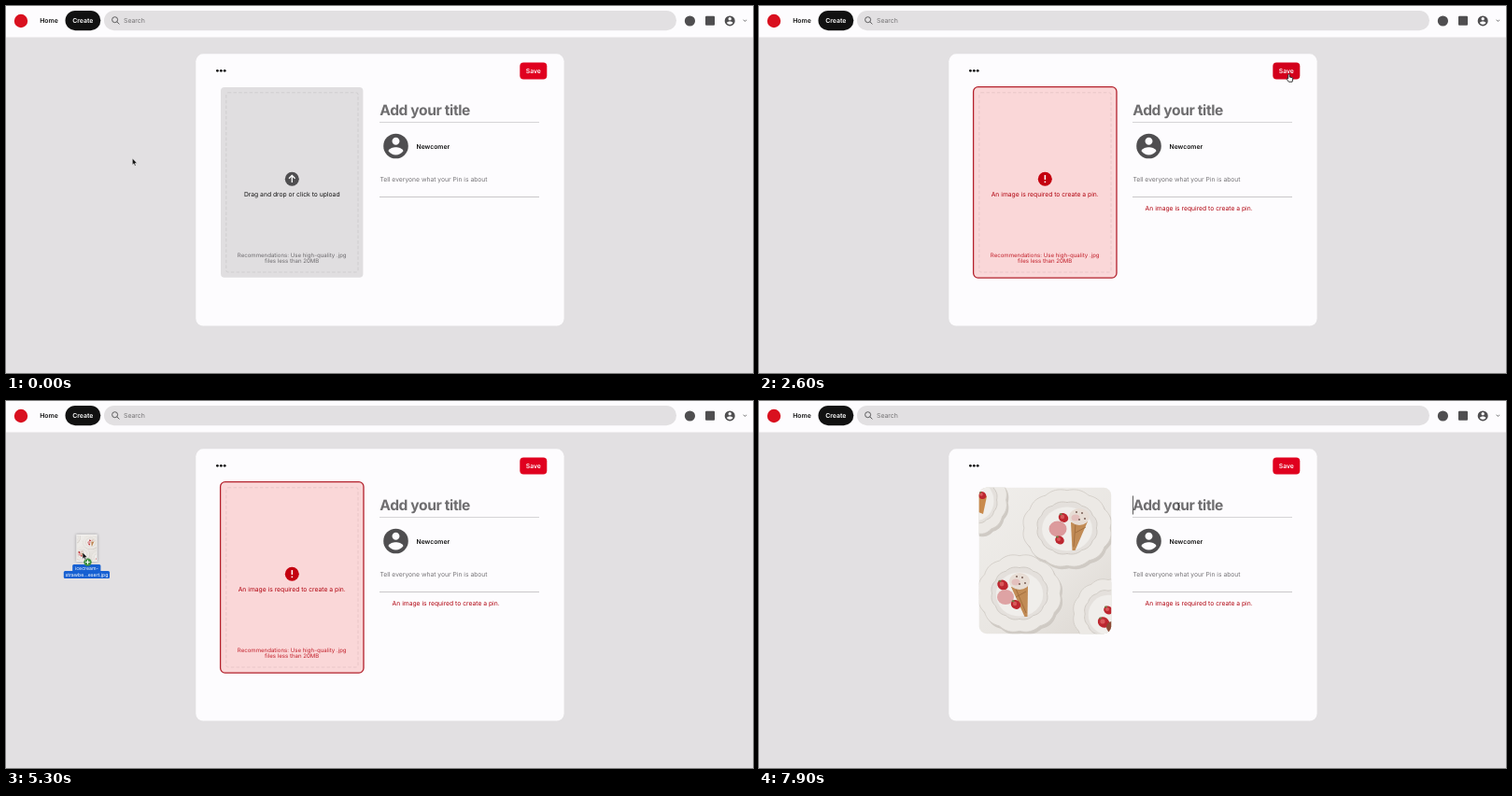
Recreate the animation shown at these times as an HTML page with a canvas. Size 800 by 393 pixels, loop 8 s.

```html
<!DOCTYPE html>
<html lang="en">
<head>
<meta charset="utf-8">
<title>Create a pin</title>
<style>
  html, body { margin: 0; width: 100%; height: 100%; overflow: hidden; background: #e2e0e2; }
  canvas { display: block; width: 100vw; height: 100vh; }
</style>
</head>
<body>
<canvas id="stage"></canvas>
<script>
const W = 800, H = 393, LOOP = 8000, STEP = 100;
const ERROR_AT = 2200, DRAG_AT = 4800, DROP_AT = 6200, PHOTO_AT = 6400, CARET_AT = 7500;
const canvas = document.getElementById('stage');
const ctx = canvas.getContext('2d');
const paper = '#fdfcfe', grey = '#e2e0e2', dark = '#4f4e50', red = '#c4000f';

// Keys are [time, x, y].
const pointerPath = [
  [0, 135.3, 163], [200, 140, 172], [400, 200, 178], [600, 320, 150], [800, 440, 122],
  [900, 480, 114], [1200, 540, 88], [1500, 566, 75], [1800, 567.5, 73], [2700, 567.5, 73],
  [3000, 440, 90], [3300, 200, 112], [3600, 10, 121], [3700, 2, 121], [3900, -10, 121]
];
const dragPath = [
  [4800, -130, -4], [4900, -95, -3], [5100, -40, -1], [5300, 0, 0], [5500, 70, 5],
  [5700, 145, 12], [5900, 182, 14], [6100, 192.5, 14]
];
const titlePath = [
  [6200, 275.5, 178.5], [6500, 275.5, 178.5], [6700, 310, 168], [6900, 400, 135],
  [7100, 460, 112], [7200, 449.5, 113]
];

function along(path, t) {
  const i = path.findIndex(k => k[0] > t);
  if (i === 0) return path[0].slice(1);
  if (i < 0) return path[path.length - 1].slice(1);
  const [t0, x0, y0] = path[i - 1], [t1, x1, y1] = path[i];
  const u = (t - t0) / (t1 - t0);
  return [x0 + (x1 - x0) * u, y0 + (y1 - y0) * u];
}

function box(x, y, w, h, r, fill, stroke, line = 1) {
  ctx.beginPath();
  ctx.roundRect(x, y, w, h, r);
  paint(fill, stroke, line);
}

function disc(x, y, rx, fill, ry = rx, turn = 0) {
  ctx.beginPath();
  ctx.ellipse(x, y, rx, ry, turn, 0, Math.PI * 2);
  paint(fill);
}

function poly(points, fill, stroke, line = 1) {
  ctx.beginPath();
  points.forEach(([x, y]) => ctx.lineTo(x, y));
  if (fill) ctx.closePath();
  paint(fill, stroke, line);
}

function paint(fill, stroke, line) {
  if (fill) { ctx.fillStyle = fill; ctx.fill(); }
  if (stroke) { ctx.strokeStyle = stroke; ctx.lineWidth = line; ctx.stroke(); }
}

function text(s, x, y, size, color, { weight = 400, align = 'left', space = 0 } = {}) {
  ctx.font = `${weight} ${size}px Inter, "Open Sans", sans-serif`;
  ctx.letterSpacing = space + 'px';
  ctx.textAlign = align;
  ctx.fillStyle = color;
  ctx.fillText(s, x, y);
}

function at(x, y, scale, draw) {
  ctx.save();
  ctx.translate(x, y);
  ctx.scale(scale, scale);
  draw();
  ctx.restore();
}

const bust = new Path2D('M0-7c1.66 0 3 1.34 3 3s-1.34 3-3 3-3-1.34-3-3 1.34-3 3-3z' +
  'm0 14.2c-2.5 0-4.71-1.28-6-3.22.03-1.99 4-3.08 6-3.08 1.99 0 5.97 1.09 6 3.08-1.29 1.94-3.5 3.22-6 3.22z');

function avatar(x, y, r) {
  at(x, y, r / 10, () => {
    disc(0, 0, 10, dark);
    ctx.fillStyle = paper;
    ctx.fill(bust);
  });
}

function header() {
  box(0, 0, W, 33.5, 0, paper);
  disc(16, 16, 7.2, '#d9101f');
  const bold = { weight: 600, align: 'center' };
  text('Home', 46, 18.4, 6.9, '#111', bold);
  box(63.5, 5, 37.8, 21.2, 10.6, '#111');
  text('Create', 82.3, 18.4, 6.9, '#fff', bold);
  box(105, 5, 613, 21.2, 10.6, grey);
  ctx.beginPath();
  ctx.arc(116.6, 14.7, 3, 0, Math.PI * 2);
  ctx.moveTo(118.8, 16.9);
  ctx.lineTo(121.4, 19.4);
  paint(null, dark, 0.9);
  text('Search', 126, 18.4, 6.9, '#747274');
  disc(732.4, 16, 5.6, dark);
  box(749, 10.8, 10, 10, 1, dark);
  avatar(775.2, 15.9, 5.5);
  poly([[789.7, 14.8], [791.4, 16.4], [793.1, 14.8]], null, dark, 0.8);
}

function rule(y) {
  box(400, y, 171, 0.9, 0, '#c9c7c9');
}

function card(hover) {
  box(203.3, 51.3, 394.3, 291.2, 8, paper);
  for (const x of [226.4, 230.3, 234.2]) disc(x, 69.3, 1.4, '#111');
  box(550.3, 60.4, 29, 18, 4, hover ? '#d3001c' : '#e0001f');
  text('Save', 564.8, 72, 6.8, '#fff', { weight: 600, align: 'center' });
  text('Add your title', 400.3, 117.4, 15.6, '#6e6d6f', { weight: 700, space: -0.4 });
  rule(124.2);
  avatar(417.5, 150, 13.3);
  text('Newcomer', 439.5, 152.5, 6.8, '#111', { weight: 600 });
  text('Tell everyone what your Pin is about', 400.4, 187.8, 6.75, '#757376');
  rule(204);
}

function dropZone(error) {
  const mid = { align: 'center' };
  if (error) box(229.6, 86.7, 153.4, 204.4, 5, '#fad7d8', '#b3202b', 1.3);
  else box(230, 87, 152.4, 203.8, 4, '#e0dee0');
  ctx.setLineDash([3.5, 2.2]);
  box(235.8, 92.8, 141.2, 192.2, 2, null, error ? '#e5c2c4' : '#cbc9cb', 0.8);
  ctx.setLineDash([]);
  disc(306.3, 185.2, 7.5, error ? red : dark);
  if (error) {
    box(305.6, 181, 1.5, 5, 0.6, '#fff');
    disc(306.35, 188.3, 0.9, '#fff');
  } else {
    poly([[306.3, 189], [306.3, 181.8]], null, '#fff', 1.3);
    poly([[303, 184.8], [306.3, 181.5], [309.6, 184.8]], null, '#fff', 1.3);
  }
  text(error ? 'An image is required to create a pin.' : 'Drag and drop or click to upload',
    306.2, 204, 6.75, error ? '#b0000d' : '#111', mid);
  const note = error ? '#c2202b' : '#6e6c6f';
  text('Recommendations: Use high-quality .jpg', 306.2, 269.2, 6.1, note, mid);
  text('files less than 20MB', 306.2, 275.3, 6.1, note, mid);
}

function scallop(x, y, rx, ry, fill, stroke) {
  ctx.beginPath();
  for (let i = 0; i <= 120; i++) {
    const a = i / 120 * Math.PI * 2;
    const k = 0.96 + 0.04 * Math.abs(Math.sin(a * 6));
    ctx.lineTo(x + rx * k * Math.cos(a), y + ry * k * Math.sin(a));
  }
  paint(fill, stroke, 0.8);
}

function plate(x, y, rx, ry) {
  scallop(x + 2, y + 3, rx, ry, '#cfcac4');
  scallop(x, y, rx, ry, '#ece9e5', '#d0cbc5');
  scallop(x, y, rx * 0.68, ry * 0.68, '#e4e0dc', '#c9c4be');
  disc(x, y + 1, rx * 0.56, '#f0eeeb', ry * 0.56);
}

function berry(x, y, r) {
  disc(x, y, r, '#bd2730', r * 0.85, 0.6);
  disc(x - 1, y - 1, r * 0.4, '#d8585a');
  disc(x - r * 0.5, y - r * 0.7, 1.6, '#6f7b45', 1);
}

function cone(x, y, tipX, tipY) {
  poly([[x - 9, y + 6], [x + 9, y + 5], [tipX + 1.5, tipY], [tipX - 1.5, tipY]], '#c18b55');
  poly([[x - 4, y + 8], [tipX, tipY - 4]], null, '#9c6939', 0.8);
  poly([[x + 7, y + 11], [x - 4, y + 17]], null, '#9c6939', 0.8);
  disc(x, y, 11, '#e7ddd5', 9);
  disc(x - 4, y + 1, 4.5, '#e3c0bd', 3.5);
  for (const [dx, dy] of [[3, -4], [6, 2], [0, 3], [-3, -5]]) disc(x + dx, y + dy, 0.9, '#6d5046');
}

function photo() {
  ctx.save();
  ctx.beginPath();
  ctx.roundRect(235.7, 92.8, 141.5, 156.4, 8);
  ctx.clip();
  const g = ctx.createLinearGradient(236, 93, 377, 249);
  g.addColorStop(0, '#f0eeeb');
  g.addColorStop(0.6, '#e9e6e2');
  g.addColorStop(1, '#dcd7d1');
  ctx.fillStyle = g;
  ctx.fillRect(235, 92, 143, 158);
  plate(233, 106, 33, 37);
  plate(330, 136, 48, 42);
  plate(279, 206, 45, 42);
  plate(374, 228, 38, 38);
  poly([[234, 96], [244, 102], [240, 121], [235, 119]], '#c98a4c');
  berry(239, 101, 4.5);
  cone(343, 124, 337, 160);
  berry(326, 125, 5.5);
  disc(320, 137, 9.5, '#dc9a9c', 8.5);
  berry(322, 149, 5);
  cone(279, 193, 286, 231);
  berry(261, 197, 6);
  disc(264, 210, 9, '#dea3a4', 8);
  berry(275, 218, 5.5);
  berry(374, 224, 5);
  berry(369, 237, 6.5);
  disc(378, 242, 6, '#8d4a35');
  ctx.restore();
}

const arrowShape = [[0, 0], [0, 7.2], [1.6, 5.8], [2.7, 8.3], [3.9, 7.8], [2.8, 5.4], [5, 5.2]];
const handShape = new Path2D('M-.8 .6Q0-.5 .8 .6L.8 3.1 3.5 3.6Q4.4 3.9 4.2 5L3.6 8.2-.2 8.2-2.4 5.2Q-2.4 4-.8 4.9Z');

function arrow(x, y) {
  at(x, y, 1, () => poly(arrowShape, '#151515', '#fff', 0.5));
}

function hand(x, y) {
  at(x, y, 1, () => {
    ctx.lineJoin = 'round';
    ctx.fillStyle = '#fff';
    ctx.fill(handShape);
    ctx.strokeStyle = '#222';
    ctx.lineWidth = 0.9;
    ctx.stroke(handShape);
  });
}

function beam(x, y) {
  at(x, y, 1, () => {
    poly([[0, -3.6], [0, 3.6]], null, '#333', 0.8);
    for (const s of [-1, 1]) poly([[-1.8, 4.2 * s], [0, 3.5 * s], [1.8, 4.2 * s]], null, '#333', 0.7);
  });
}

const inside = ([x, y], l, t, r, b) => x > l && x < r && y > t && y < b;
const overSave = p => inside(p, 550, 60, 579.5, 78.5);

function pointer(p) {
  if (overSave(p) || inside(p, 230, 87, 382, 291)) hand(...p);
  else if (inside(p, 400, 101, 571, 124) || inside(p, 400, 178, 571, 204)) beam(...p);
  else arrow(...p);
}

function draggedFile([dx, dy]) {
  at(dx, dy, 1, () => {
    ctx.save();
    ctx.shadowColor = 'rgba(0,0,0,.3)';
    ctx.shadowBlur = 3;
    box(75.3, 143, 22.4, 29, 0, '#f3f1ef');
    ctx.restore();
    ctx.save();
    ctx.beginPath();
    ctx.rect(76, 143.7, 21, 27.6);
    ctx.clip();
    at(86.5 - 306.5 * 0.177, 157.5 - 171 * 0.177, 0.177, photo);
    ctx.restore();
    const blue = '#1760d2';
    box(71.2, 175, 30.2, 8, 1.5, blue);
    box(61.8, 182, 49.2, 8, 1.5, blue);
    text('icecream-', 86.4, 180.8, 5.2, '#fff', { align: 'center' });
    text('strawbe...esert.jpg', 86.4, 187.7, 5.2, '#fff', { align: 'center' });
    disc(87.5, 172.6, 4.2, '#3f9142');
    poly([[85.2, 172.6], [89.8, 172.6]], null, '#fff', 1);
    poly([[87.5, 170.3], [87.5, 174.9]], null, '#fff', 1);
    arrow(82, 162);
  });
}

function draw(t) {
  const scale = window.devicePixelRatio || 1;
  const w = Math.round(innerWidth * scale), h = Math.round(innerHeight * scale);
  if (canvas.width !== w || canvas.height !== h) {
    canvas.width = w;
    canvas.height = h;
  }
  ctx.setTransform(w / W, 0, 0, h / H, 0, 0);
  ctx.textRendering = 'geometricPrecision';
  ctx.fillStyle = grey;
  ctx.fillRect(0, 0, W, H);

  const dragging = t >= DRAG_AT && t < DROP_AT;
  const p = along(t < DROP_AT ? pointerPath : titlePath, t);
  header();
  card(overSave(p));
  if (t >= PHOTO_AT) photo();
  else dropZone(t >= ERROR_AT && t < DROP_AT);
  if (t >= ERROR_AT) text('An image is required to create a pin.', 413.6, 218.8, 6.75, '#b0000d');
  if (t >= CARET_AT) box(400.2, 101.5, 0.8, 20, 0, '#333');
  if (dragging) draggedFile(along(dragPath, t));
  else pointer(p);
}

function tick() {
  const t = performance.now() % LOOP;
  draw(Math.floor(t / STEP) * STEP);
  requestAnimationFrame(tick);
}
tick();
</script>
</body>
</html>
```
